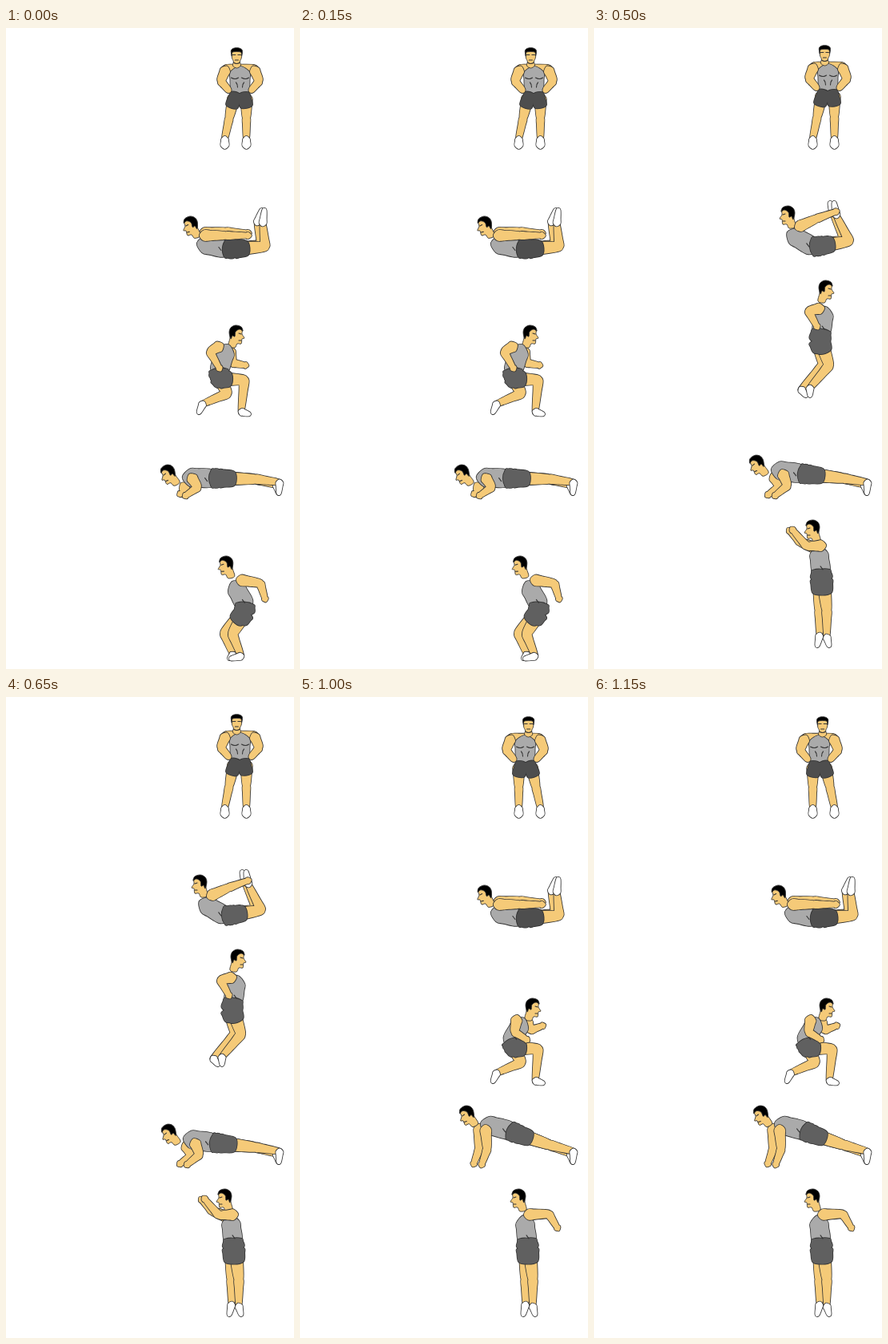
Animation of 360 by 800 pixels, one loop 1250 ms. Source, as an HTML page:

```html
<!DOCTYPE html>
<html lang="en">
<head>
<meta charset="utf-8">
<title>Exercises</title>
<style>
  html, body { margin: 0; width: 100%; height: 100%; overflow: hidden; background: #fff; }
  svg { display: block; width: 100vw; height: 100vh; stroke: #333; stroke-width: .85; stroke-linejoin: round; stroke-linecap: round; }
</style>
</head>
<body>
<svg id="stage" viewBox="0 0 360 800"></svg>
<script>
const skin = '#f5ca78', cloth = '#aaa', grey = '#606060', dark = '#4e4e4e', white = '#fff';

const points = text => text.split(' ').map(p => p.split(',').map(Number));
const along = (a, b, t) => a.map((v, i) => v + (b[i] - v) * t);

// Closed smooth curve through points
function outline(p) {
  const at = i => p[(i + p.length) % p.length];
  return 'M' + p[0] + p.map((a, i) => {
    const before = at(i - 1), b = at(i + 1), after = at(i + 2);
    const c1 = a.map((v, k) => v + (b[k] - before[k]) / 6);
    const c2 = b.map((v, k) => v - (after[k] - a[k]) / 6);
    return `C${c1} ${c2} ${b}`;
  }).join('') + 'Z';
}

// Tapered, slightly bulging body segment from a to b
function bone(a, b, ra, rb, cap = .8) {
  const angle = Math.atan2(b[1] - a[1], b[0] - a[0]);
  const u = [Math.cos(angle), Math.sin(angle)];
  const offset = (p, forward, side) => [p[0] + u[0] * forward - u[1] * side, p[1] + u[1] * forward + u[0] * side];
  const belly = along(a, b, .35), rm = (ra * .65 + rb * .35) * 1.06;
  return outline([
    offset(a, 0, ra), offset(belly, 0, rm), offset(b, 0, rb), offset(b, rb * cap, 0),
    offset(b, 0, -rb), offset(belly, 0, -rm), offset(a, 0, -ra), offset(a, -ra * cap, 0)
  ]);
}

// Joins segments under one common outline
function blend(fill, ...paths) {
  const d = paths.join('');
  return `<path fill="${fill}" stroke-width="1.7" d="${d}"/><path fill="${fill}" stroke="none" d="${d}"/>`;
}
const shape = (fill, text) => `<path fill="${fill}" d="${outline(points(text))}"/>`;
const line = (d, w = 1.1) => `<path fill="none" stroke-width="${w}" d="${d}"/>`;
const group = (transform, ...parts) => `<g transform="${transform}">${parts.join('')}</g>`;

const arm = ([shoulder, elbow, hand]) => blend(skin,
  bone(shoulder, elbow, 6.5, 4.6), bone(elbow, hand, 4.8, 3),
  bone(along(elbow, hand, .92), along(elbow, hand, 1.04), 3.8, 3.6));
const leg = ([hip, knee, ankle, toe]) =>
  blend(skin, bone(hip, knee, 8.2, 5.5), bone(knee, ankle, 5.6, 3.4))
  + blend(white, bone(ankle, toe, 4.4, 2.6));
const shorts = (fill, waist, legs) => blend(fill, ...legs.flatMap(([hip, knee]) => [
  bone(waist, hip, 11, 11, .3), bone(hip, along(hip, knee, .42), 10.8, 8.8, .3)
]));

// Profile head with neck, looking left; side = -1 looks right
const head = (x, y, tilt = 0, side = 1) => group(
  `translate(${x} ${y}) scale(${side} 1) rotate(${tilt})`,
  shape(skin, '-7,-6 -7,-1 -10,4 -7,5 -6,11 -1,11 2,16 10,14 8,4 7,-6 0,-10'),
  shape('#000', '-8,-5 -6,-10 1,-12 7,-9 9,-3 7,5 5,1 2,2 1,-4 -4,-7'),
  line('M-6-1l3-1M-6 7h3'));

function figure({ look, body, legs, arms, far, shade = grey }) {
  const [chest, waist] = points(body), limbs = legs.map(points);
  const [bx, by] = along(chest, waist, .7);
  return (far ? arm(points(far)) : '') + limbs.map(leg).join('') + head(...look)
    + blend(cloth, bone(chest, waist, 10.5, 10.8))
    + shorts(shade, waist, limbs)
    + line(`M${bx} ${by}l3 4`) + arm(points(arms));
}

// Front view with hands on hips; the body shifts over fixed feet
function stand(shift, lift) {
  const c = 287 + shift, at = (dx, y) => [c + dx, y - lift], sides = [-1, 1];
  const legs = sides.map(s => [at(8 * s, 87), [287 + 13.5 * s, 138]]);
  return legs.map(([hip, foot]) => {
      const knee = along(hip, foot, .5);
      return blend(skin, bone(hip, knee, 7, 4.6), bone(knee, foot, 4.7, 3.5))
        + blend(white, bone(foot, [foot[0], 147], 4, 5));
    }).join('')
    + blend(skin, bone(at(-18, 51), at(18, 51), 5, 5))
    + blend(cloth, bone(at(0, 55), at(0, 79), 12, 10.5, .6))
    + blend(dark, ...legs.map(([hip, foot]) => bone(at(hip[0] < c ? -5 : 5, 82), along(hip, foot, .21), 6.5, 7.6, .3)))
    + sides.map(s => blend(skin,
        bone(at(18 * s, 52), at(24 * s, 66), 6, 4.8), bone(at(24 * s, 66), at(14 * s, 78), 4.6, 3.6))).join('')
    + group(`translate(${c} ${-lift})`, line('M-11 62q5 3 9 0M2 62q5 3 9 0M-5 68q2 2 2 6M5 68q-2 2-2 6'))
    + group(`translate(${287 + shift * .25} ${32 - lift})`,
        shape(skin, '-6,-3 -6,5 -4,10 -5,15 0,18 5,15 4,10 6,5 6,-3 0,-5'),
        shape('#000', '-6,3 -7,-4 -3,-7 3,-7 7,-4 6,3 5,-2 -5,-2'),
        line('M-5 1.5h3.5M1.5 1.5h3.5M-2 8h4M-4 11q4 3 8 0'));
}

const lie = figure({
  look: [231, 247, -10], body: '247,270 274,275', shade: dark,
  legs: ['286,276 320,271 314,243 320,227', '286,276 324,273 321,244 323,227'],
  far: '247,256 275,254 303,256', arms: '247,259 275,259 303,259'
});
const bow = figure({
  look: [242, 234], body: '249,259 273,273',
  legs: ['284,272 314,265 299,232 295,218', '284,272 319,266 303,234 300,218'],
  arms: '256,248 278,238 303,229'
});

const kneel = (look, body, far, arms) => figure({
  look, body, far, arms,
  legs: ['266,436 277,456 246,469 241,480', '268,438 298,439 294,479 304,482']
});
const lungeBack = kneel([288, 383, 0, -1], '275,403 266,428', '280,403 283,418 300,421', '267,397 255,404 267,425');
const lungeFront = kneel([291, 388, 0, -1], '276,408 264,430', '284,406 288,416 304,410', '271,402 268,418 284,428');

const stride = (look, body, far, arms) => figure({
  look, body, far, arms,
  legs: ['277,412 263,442 243,472 251,477', '283,412 300,443 294,479 304,482']
});
const strideUp = stride([291, 349, 0, -1], '285,376 282,402', '291,379 307,377 315,358', '280,370 298,363 312,342');
const strideArm = stride([290, 353, 0, -1], '285,379 282,403', '293,380 307,377 315,358', '270,373 262,380 264,400');
const leap = figure({
  look: [290, 327, 0, -1], body: '288,356 284,379',
  legs: ['280,391 287,420 259,451 265,459', '284,391 294,421 270,449 270,459'],
  arms: '283,350 268,353 279,373'
});

// Push-up: toes stay planted, the body turns about them
const push = (look, body, hip, knee, far, arms) => figure({
  look, body, far, arms,
  legs: [`${hip} ${knee} 338,570 341,581`, `${hip} ${knee} 342,567 341,581`]
});
const pushLow = push([203, 557, -20], '229,561 257,562', '266,562', '312,563', '222,572 226,577 217,582', '232,561 240,573 224,584');
const pushMid = push([204, 545, -20], '230,552 258,556', '267,557', '312,562', '225,560 232,572 217,583', '236,556 242,571 226,584');
const pushHigh = push([209, 522, -18], '234,534 262,541', '271,545', '312,559', '224,538 224,564 217,583', '232,539 234,564 227,584');

const crouch = (arms, far) => figure({
  look: [275, 671, -3], body: '287,698 299,720', arms, far,
  legs: ['297,729 273,755 284,782 279,787', '299,730 283,756 294,784 281,787']
});
const flight = (arms, far) => figure({
  look: [273, 626], body: '281,655 284,679', arms, far,
  legs: ['282,689 282,727 282,758 279,771', '287,689 291,727 291,760 294,771']
});
const tuck = figure({
  look: [252, 638, -5], body: '272,661 283,681',
  legs: ['285,687 252,691 275,714 280,729', '285,688 254,694 281,715 286,729'],
  far: '268,656 249,653 230,643', arms: '274,656 257,668 231,661'
});
const crouchBack = crouch('293,689 318,693 324,713');
const crouchFront = crouch('292,691 274,700 248,688', '285,693 269,692 253,679');
const flightFront = flight('285,646 266,647 248,626', '275,648 258,642 244,627');
const flightBack = flight('285,646 311,645 322,663');

const step = 250;
const scenes = [
  [stand(5.5, 0), lie, lungeBack, pushLow, crouchBack],
  [stand(5.5, 0), lie, strideUp, pushLow, crouchFront],
  [stand(5.5, 3), bow, leap, pushMid, flightFront],
  [stand(-.5, 3), bow, strideArm, pushHigh, tuck],
  [stand(-5.5, 0), lie, lungeFront, pushHigh, flightBack]
].map(parts => parts.join(''));

const stage = document.getElementById('stage');
let shown = -1;
function draw() {
  const index = Math.floor(performance.now() / step) % scenes.length;
  if (index !== shown) stage.innerHTML = scenes[shown = index];
  requestAnimationFrame(draw);
}
draw();
</script>
</body>
</html>
```
